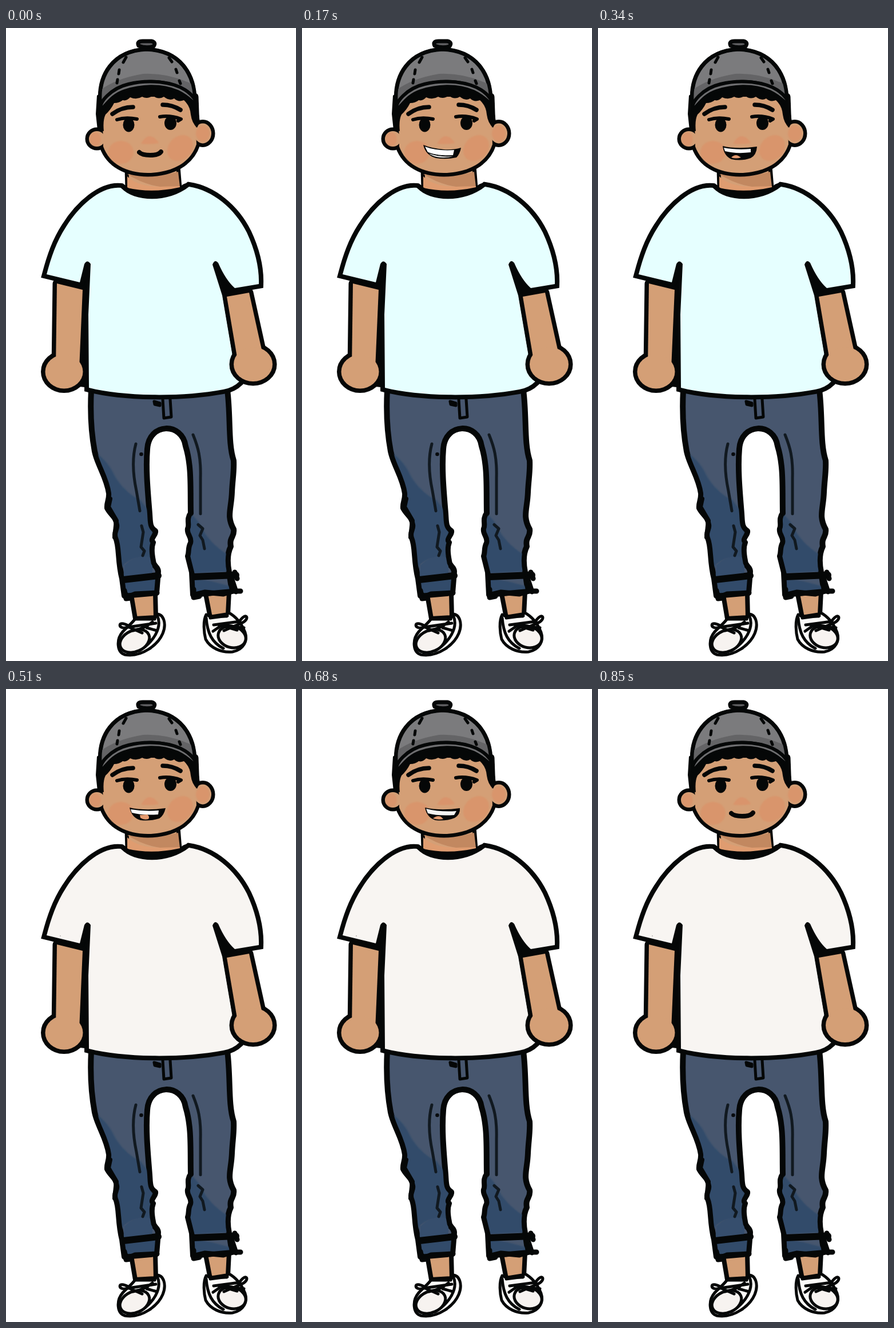
Recreate the animation shown at these times as an HTML page. Size 507 by 1105 pixels, loop 1.02 s.

```html
<!DOCTYPE html>
<html lang="en">
<head>
<meta charset="utf-8">
<title>Talking boy</title>
<style>
  html, body { margin: 0; width: 100%; height: 100%; overflow: hidden; background: #fff; }
  svg { display: block; width: 507px; height: 1105px; }
  .ink { stroke: #050707; stroke-linecap: round; stroke-linejoin: round; }
  .sharp { stroke-linejoin: miter; stroke-miterlimit: 1.6; }
  .line { fill: none; }
  .skin { fill: #d49f76; }
  .blush { fill: #dc8f66; }
  .mouth { opacity: 0; }
</style>
</head>
<body>
<svg viewBox="0 0 507 1105">
  <defs>
    <filter id="soft" x="-20%" y="-20%" width="140%" height="140%"><feGaussianBlur stdDeviation="1.2"/></filter>
    <path id="tee" d="M201 279C167 275 128 310 105 347C88 373 79 400 71 430L129 444L137 412Q142 403 148 412L144 500L145 628C205 643 305 645 380 631Q397 628 408 617L396 570L379 470L361 413Q365 403 371 410Q384 440 400 454L442 447C443 420 436 389 421 357C400 315 361 283 320 277C285 305 225 305 201 279Z"/>
    <g id="armL"><path d="M89 446L134 457L128 595H87Z"/><ellipse cx="101.500" cy="600" rx="33" ry="29.500"/></g>
    <g id="armR"><path d="M386 469L425 462L450 575L440 598L407 592Z"/><ellipse cx="432" cy="587" rx="34" ry="30"/></g>
    <g id="head">
      <path d="M168 120L170 207C181 237 210 253 248 253C290 252 322 236 333 203L330 120Z"/>
      <ellipse cx="159" cy="193.500" rx="14" ry="13.500"/>
      <ellipse cx="344" cy="184" rx="15" ry="17.500"/>
    </g>
    <path id="jeans" d="M149 632C147 670 149 707 155 739C160 763 176 784 180 812C181 824 176 828 177 838C183 850 192 852 194 867C196 875 188 880 192 890C199 906 195 930 203 961L207 991L263 986L266 949C266 940 257 940 257 930C254 915 254 905 257 898C250 892 263 884 261 878C251 872 252 863 251 848C248 810 244 770 247 735C250 688 308 688 314 730C325 765 322 805 323 847C315 858 322 867 318 874C316 884 326 888 323 899C318 908 321 915 318 922L325 950L327 989L395 983L390 950C386 930 388 915 393 905C390 888 400 889 398 875C385 852 394 840 395 810C396 787 399 775 398 755C388 725 393 680 387 632Z"/>
    <clipPath id="inJeans"><use href="#jeans"/></clipPath>
    <path id="dome" d="M165 133C160 82 187 40 245 37C304 39 331 80 330 130C315 104 285 92 246 94C202 96 180 112 165 133Z"/>
    <clipPath id="inDome"><use href="#dome"/></clipPath>
  </defs>

  <!-- ankles and shoes -->
  <g class="ink skin" stroke-width="8">
    <path d="M219 990L226 1031L262 1029L261 986Z"/>
    <path d="M349 988L357 1029L388 1024L390 984Z"/>
  </g>
  <g class="ink" fill="#fbfaf8" stroke-width="5">
    <path d="M226 1031C220 1040 211 1046 204 1054C192 1068 194 1090 208 1094C238 1099 266 1076 274 1057C281 1040 276 1023 263 1023L260 1031Z"/>
    <path class="line" d="M265 1027C273 1047 258 1072 233 1087"/>
    <ellipse fill="#f7f3f0" cx="225" cy="1070" rx="27" ry="18.500" transform="rotate(-24 225 1070)"/>
    <path class="line" d="M226 1032L260 1032M213 1043C194 1032 195 1052 213 1046L262 1039M213 1045L238 1056M222 1052Q242 1049 256 1037M246 1047L264 1052"/>
    <path d="M356 1027L350 1024C344 1035 346 1055 349 1067C357 1082 376 1091 396 1089C416 1085 423 1069 418 1055C412 1040 402 1027 388 1020L386 1027Z"/>
    <path class="line" d="M350 1030C352 1056 360 1073 380 1083"/>
    <ellipse fill="#f7f3f0" cx="395" cy="1063" rx="24.500" ry="18.500" transform="rotate(15 395 1063)"/>
    <path class="line" d="M357 1030L387 1026M363 1042L408 1036C422 1016 427 1034 411 1039L381 1052M362 1053L378 1042L416 1047M370 1041L404 1051"/>
  </g>

  <!-- jeans -->
  <use href="#jeans" class="ink" stroke-width="10" fill="#47566e"/>
  <g clip-path="url(#inJeans)">
    <g fill="#314c6b" filter="url(#soft)">
      <path d="M150 738Q176 751 190 782Q208 812 235 824L256 852V925Q228 920 208 935L195 955L165 830Z"/>
      <path d="M318 845Q337 857 348 883Q370 912 397 924V948L322 952Z"/>
      <path d="M198 962L268 955V992H200ZM323 960L360 966L397 976V990H323Z"/>
    </g>
    <path d="M207 938Q230 916 256 925V955L205 960Z" fill="#364e6d"/>
  </g>
  <use href="#jeans" class="ink line" stroke-width="8"/>
  <g class="ink line" stroke-width="5">
    <path d="M227 726C220 752 222 780 228 808L234 843M327 710C336 732 341 750 340 785L340 848" stroke="#111920"/>
    <path d="M237 869L240 880L236 906L242 913L239 921M336 867L344 874L339 886L344 894L347 909" stroke="#111920"/>
    <path d="M274 648L276 681L289 679L287 648"/>
    <path d="M259 652L269 655V659L260 657Z" fill="#050707"/>
    <path d="M149 640V661M182 822L179 836L193 860L190 889" stroke-width="8"/>
    <path d="M206 963L266 956M328 958L402 955" stroke-width="12"/>
    <path d="M207 987L214 993L226 988L264 986M327 990L348 985L380 988L397 983L410 983M394 960L402 984M400 950L404 961" stroke-width="9"/>
    <path d="M207 982L210 996L218 995M328 980L328 994L338 992" stroke-width="9"/>
  </g>
  <circle cx="236.500" cy="744" r="3.300" fill="#080b0e"/>

  <!-- shirt and arms -->
  <g fill="#050707">
    <path d="M130 430L138 408L147 407L147 628L128 626L136 580Z"/>
    <path d="M361 408Q366 399 372 410L400 458L387 470L405 575L395 580L378 470Z"/>
  </g>
  <path class="ink skin" stroke-width="7" d="M211 246L212 280Q255 293 304 279L301 242Z"/>
  <path d="M212 255Q257 263 301 251L304 277Q255 283 212 255Z" fill="#c28860"/>
  <path d="M212 259Q230 277 270 277L304 276V282Q255 292 212 281Z" fill="#df9c70"/>
  <use href="#tee" class="ink sharp" stroke-width="16"/>
  <use href="#tee" id="cloth" fill="#e6ffff"/>
  <circle id="speck" cx="95" cy="431" r=".8" fill="#8d8a87" opacity="0"/>
  <path d="M197 275Q207 269 212 279Q255 289 304 278Q313 267 324 273C288 305 222 304 197 275Z" fill="#050707"/>
  <g class="ink" stroke-width="15"><use href="#armL"/><use href="#armR"/></g>
  <g class="skin"><use href="#armL"/><use href="#armR"/></g>

  <!-- head -->
  <use href="#head" class="ink" stroke-width="13"/>
  <use href="#head" class="skin"/>
  <g class="blush" filter="url(#soft)">
    <ellipse cx="201" cy="217" rx="22" ry="20" opacity=".6"/>
    <ellipse cx="304.500" cy="209.500" rx="25" ry="20" transform="rotate(-45 304.500 209.500)" opacity=".6"/>
    <path d="M236 202C240 195 245 189 251 189C258 189 264 195 267 201Q251 204 236 202Z" opacity=".65"/>
    <ellipse cx="156" cy="194" rx="10" ry="12" opacity=".6"/>
    <ellipse cx="344" cy="184" rx="12" ry="14" opacity=".6"/>
  </g>
  <path d="M159 118L157 150L160 178L171 180Q169 161 174 151Q183 143 189 131Q198 131 204 126Q211 128 217 121Q228 126 238 120Q247 125 257 118Q266 126 276 120Q286 128 294 123Q301 130 311 126Q322 136 323 151Q325 166 334 174L339 164L334 130C310 92 190 88 159 118Z" fill="#050707"/>
  <g class="ink line" stroke-width="7.500">
    <path d="M186 150Q202 138 222 138M274 134Q291 134 305 143"/>
    <path d="M194 160Q209 155 229 159M269 155Q287 152 306 159L301 162" stroke-width="6"/>
  </g>
  <g fill="#050707">
    <ellipse cx="214.500" cy="169" rx="10" ry="12.500"/>
    <ellipse cx="287.500" cy="166" rx="10.500" ry="12"/>
  </g>

  <!-- cap -->
  <path class="ink" stroke-width="7" fill="#5e5e60" d="M232 31Q228 23 239 23L254 23Q263 25 258 32Q245 36 232 31Z"/>
  <use href="#dome" class="ink" stroke-width="7" fill="#7b7b7d"/>
  <path clip-path="url(#inDome)" d="M160 112Q190 88 240 80Q290 78 335 103V135H160Z" fill="#646466"/>
  <use href="#dome" class="ink line" stroke-width="6"/>
  <path class="ink" stroke-width="6" fill="#6e6e70" d="M166 143C160 131 184 105 214 98C250 89 291 94 313 108C326 116 335 129 334 137C326 128 317 119 300 111C270 98 235 101 207 110C186 117 177 132 166 143Z"/>
  <path class="ink line" stroke-width="5" d="M210 51L205 60M198 73L197 80M195 90L194 96M285 52L290 59M297 72L299 78M303 92L305 97"/>

  <!-- mouths -->
  <g class="mouth" data-on="100001">
    <path class="ink line" stroke-width="8" d="M233 217Q238 222 252 222Q267 222 271 216"/>
  </g>
  <g class="mouth" data-on="010000">
    <path d="M212 204Q226 210 248 212Q264 213 278 209Q276 220 270 226Q252 230 234 227Q216 222 212 204Z" fill="#050707"/>
    <path d="M215 207Q235 215 266 213L264 222Q238 225 220 217Z" fill="#fff"/>
    <path d="M219 217Q236 224 264 223" class="ink line" stroke-width="1"/>
    <path d="M222 219Q240 226 264 224Q250 228 235 225Q227 223 222 219Z" fill="#e9e7e5"/>
  </g>
  <g class="mouth" data-on="001000">
    <path d="M218 206Q242 212 278 207Q277 222 267 227Q251 233 233 229Q220 223 218 206Z" fill="#050707"/>
    <path d="M220 209Q241 213 267 211L267 217Q241 220 222 215Z" fill="#f9fbfc"/>
    <path d="M233 226Q239 220 245 223L250 226Q241 229 233 226Z" fill="#e49b70"/>
  </g>
  <g class="mouth" data-on="000100">
    <path d="M216 207Q243 213 279 208Q276 221 268 226Q252 231 235 229Q220 225 216 207Z" fill="#050707"/>
    <path d="M218 210Q241 214 267 212L266 219Q239 221 220 216Z" fill="#f9fbfc"/>
    <path d="M234 220L247 219Q252 223 249 227Q241 229 235 225Z" fill="#e49b70"/>
  </g>
  <g class="mouth" data-on="000010">
    <path d="M215 207Q242 213 276 208Q277 219 267 225Q252 231 233 229Q218 224 215 207Z" fill="#050707"/>
    <path d="M217 209Q241 215 270 213L266 220Q238 222 220 217Z" fill="#f3f3f2"/>
    <path d="M229 226Q236 220 243 223L247 227Q238 229 229 226Z" fill="#e49b70"/>
  </g>
</svg>
<script>
  const STEP = 170;

  // Holds each value for one step, then jumps to the next.
  function play(el, prop, values) {
    const frames = [...values, values[0]].map((v, i) => ({
      [prop]: v, offset: i / values.length, easing: 'step-end'
    }));
    el.animate(frames, { duration: STEP * values.length, iterations: Infinity });
  }

  document.querySelectorAll('.mouth').forEach(m => play(m, 'opacity', [...m.dataset.on].map(Number)));
  play(document.getElementById('cloth'), 'fill', ['#e6ffff', '#f8f5f2'].flatMap(c => [c, c, c]));
  play(document.getElementById('speck'), 'opacity', [0, 0, 0, 1, 1, 1]);
</script>
</body>
</html>
```
